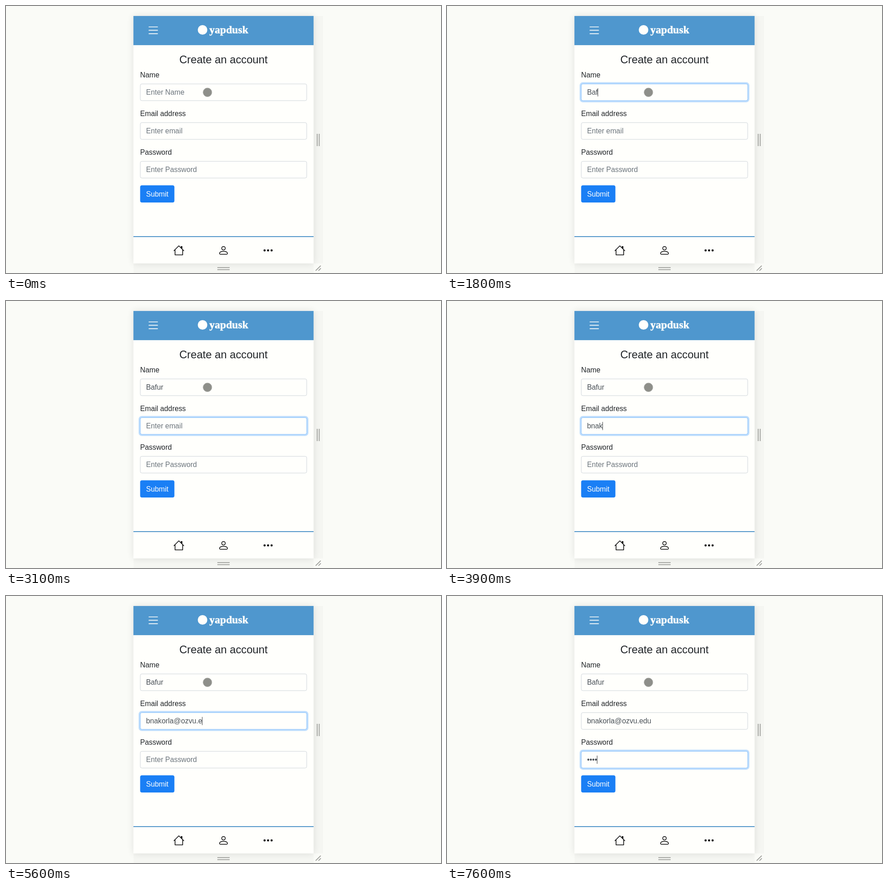
An HTML page for the animation above (8 s loop, 955 px wide and 587 px high).

```html
<!DOCTYPE html>
<html lang="en">
<head>
<meta charset="utf-8">
<title>Create an account</title>
<style>
  html, body { margin: 0; width: 100%; height: 100%; overflow: hidden; background: #fafbf7; }
  svg { display: block; width: 100%; height: 100%; }
  text { font: 15.83px "Liberation Sans", Arial, sans-serif; fill: #212529; }
  .title { font-size: 23.74px; text-anchor: middle; }
  .brand { font: bold 23.6px "Liberation Serif", "Times New Roman", serif; fill: #fffffc; stroke: #fffffc; stroke-width: .6; }
  .light { fill: #fffffc; }
  .line { fill: none; stroke-linejoin: round; }
  .round { stroke-linecap: round; }
</style>
</head>
<body>
<svg viewBox="0 0 955 587">
  <defs>
    <filter id="blur" x="-20%" y="-20%" width="140%" height="140%">
      <feGaussianBlur stdDeviation="8"/>
    </filter>
  </defs>

  <!-- device frame with its resize handles -->
  <rect width="955" height="587" fill="#fafbf7"/>
  <rect x="279.7" y="22" width="395.6" height="544" opacity=".1" filter="url(#blur)"/>
  <path d="M675.3 22H696V566H675.3ZM280 566H675.3V587H280Z" opacity=".02"/>
  <g class="line" stroke="#9c9d99" stroke-width="1.8">
    <path d="M683.2 281V308M687.6 281V308M464 575.2H491M464 579.6H491"/>
    <path d="M679.8 581.8L691 570.8M686 581.8L691.2 576.7"/>
  </g>
  <rect x="279.7" y="21.9" width="395.6" height="544" fill="#fffffc"/>

  <!-- header -->
  <rect x="279.7" y="21.9" width="395.6" height="64.2" fill="#4f97ce"/>
  <path class="line round" d="M313.9 46H332.7M313.9 53.4H332.7M313.9 60.8H332.7" stroke="#fffffc" stroke-width="1.7"/>
  <circle class="light" cx="431.5" cy="52.5" r="10.5"/>
  <text class="brand" x="446.5" y="60">yapdusk</text>

  <!-- form -->
  <text class="title" x="477.4" y="125.7">Create an account</text>
  <g id="form"></g>
  <rect x="294.5" y="394.3" width="75.2" height="37.6" rx="4" fill="#1a7ff5"/>
  <text class="light" x="307.4" y="419.2">Submit</text>

  <!-- bottom navigation -->
  <path d="M279.7 507H675.3" stroke="#5296ca" stroke-width="2"/>
  <g class="line round" stroke="#0a0a0a" stroke-width="1.55">
    <path d="M368.7 538L379.5 527.2L390.3 538M371.2 536V547.3H387.8V536"/>
    <path d="M384.6 528.8H386.4V533.2L384.6 531.4Z" fill="#0a0a0a"/>
    <circle cx="477.5" cy="532.6" r="3.9"/>
    <path d="M470.5 545.7H484.5Q486.2 545.7 486.2 544C486.2 541.4 483 539.5 477.5 539.5S468.8 541.4 468.8 544Q468.8 545.7 470.5 545.7Z"/>
  </g>
  <!-- zero-length round strokes make the three dots -->
  <path class="round" d="M567.7 537.3h0M575.4 537.3h0M583.1 537.3h0" stroke="#0a0a0a" stroke-width="4.8"/>

  <path id="caret" stroke="#33363a"/>
  <circle cx="442.3" cy="189.8" r="9.7" fill="#8e8f8a" stroke="#b4b5b0"/>
</svg>

<script>
const LOOP = 8000;
const TICK = 100;      // the screen refreshes ten times a second
const FADE = 200;      // focus ring transition
const BLINK = 500;     // caret half period
const TEXT_X = 307.4;

// keys: [time, characters typed]; the typing runs evenly from one key point to the next.
const fields = [
  { label: "Name", hint: "Enter Name", value: "Bafur",
    focusAt: 640, keys: [[1600, 1], [1800, 3], [2100, 5]] },
  { label: "Email address", hint: "Enter email", value: "bnakorla@ozvu.edu",
    focusAt: 2380, keys: [[3600, 2], [3900, 4], [4200, 8], [4800, 9], [5300, 13], [5600, 15], [6200, 17]] },
  { label: "Password", hint: "Enter Password", value: "••••",
    focusAt: 6440, keys: [[7100, 1], [7200, 2], [7600, 4]] }
];

const form = document.getElementById("form");
const caret = document.getElementById("caret");

function setAttributes(node, attrs) {
  for (const name in attrs) node.setAttribute(name, attrs[name]);
}

function add(tag, attrs, content = "") {
  const node = document.createElementNS("http://www.w3.org/2000/svg", tag);
  setAttributes(node, attrs);
  node.textContent = content;
  return form.appendChild(node);
}

fields.forEach((field, i) => {
  const top = field.top = 170.8 + 85.05 * i;
  add("text", { x: 294.5, y: top - 14 }, field.label);
  field.glow = add("rect", { fill: "#007bff" });
  field.box = add("rect", { x: 294.8, y: top + .5, width: 365.4, height: 36.8, rx: 3.6, fill: "#fffffc" });
  field.text = add("text", { x: TEXT_X, y: top + 24.5 });
  field.blurAt = i + 1 < fields.length ? fields[i + 1].focusAt : Infinity;
});

const ramp = (time, from) => Math.min(1, Math.max(0, (time - from) / FADE));
const mix = (a, b, amount) => Math.round(a + (b - a) * amount);

function typedCount(keys, time) {
  const next = keys.findIndex(key => key[0] > time);
  if (next < 0) return keys[keys.length - 1][1];
  if (next === 0) return 0;
  const [t0, n0] = keys[next - 1], [t1, n1] = keys[next];
  return Math.floor(n0 + (n1 - n0) * (time - t0) / (t1 - t0) + 1e-6);
}

function drawField(field, time) {
  const { top, glow, box, text, value, hint } = field;
  const focus = ramp(time, field.focusAt) - ramp(time, field.blurAt);
  const spread = 3.2 * focus;
  setAttributes(glow, {
    x: 294.3 - spread, y: top - spread,
    width: 366.4 + 2 * spread, height: 37.8 + 2 * spread,
    rx: 4 + spread, opacity: .25 * focus
  });
  box.setAttribute("stroke", `rgb(${mix(206, 128, focus)},${mix(212, 189, focus)},${mix(218, 252, focus)})`);

  const count = typedCount(field.keys, time);
  text.textContent = count ? value.slice(0, count) : hint;
  text.style.fill = count ? "#495057" : "#6c757d";
  if (time >= field.focusAt && time < field.blurAt) drawCaret(field, count, time);
}

// The caret restarts its blinking after each key point.
function drawCaret({ focusAt, keys, text, top }, count, time) {
  const lastKey = Math.max(focusAt, ...keys.map(key => key[0]).filter(t => t <= time));
  if ((time - lastKey) % (2 * BLINK) >= BLINK) return;
  const x = TEXT_X + (count ? text.getComputedTextLength() : .4);
  caret.setAttribute("d", `M${x} ${top + 10}v18`);
}

function draw(time) {
  caret.setAttribute("d", "");
  for (const field of fields) drawField(field, time);
}

const start = performance.now();
function tick() {
  const time = (performance.now() - start) % LOOP;
  draw(Math.floor(time / TICK) * TICK);
  requestAnimationFrame(tick);
}
tick();
</script>
</body>
</html>
```
